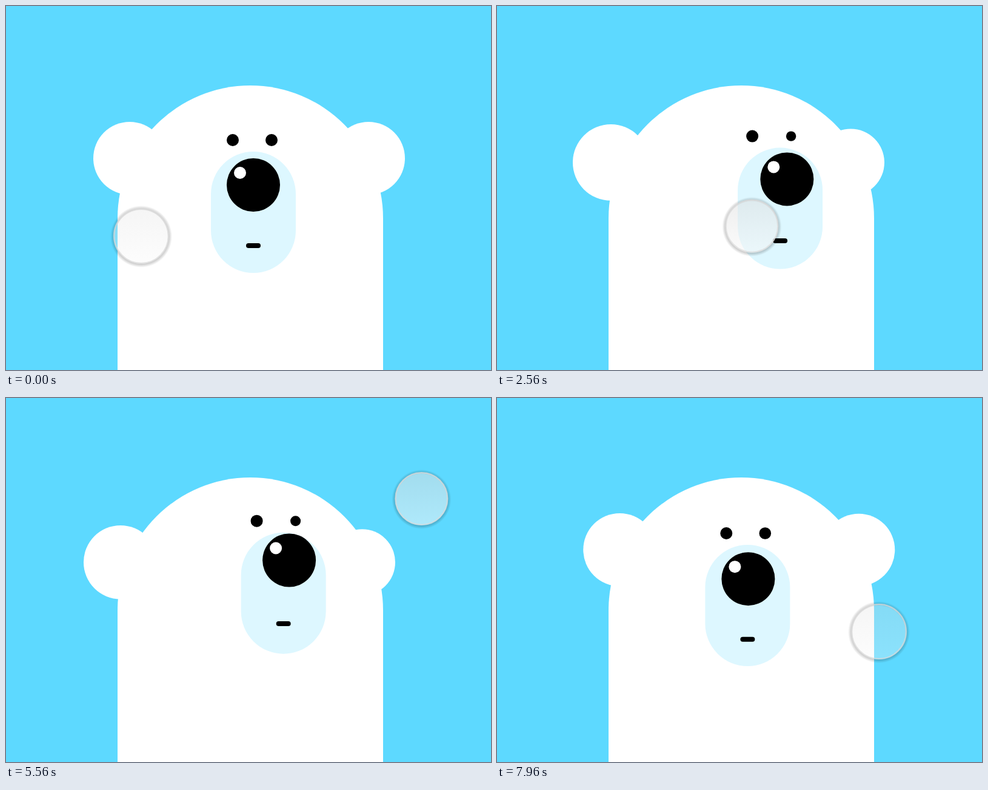
These frames come from a looping animation (800 by 600 pixels, 8000 ms). An HTML page:

```html
<!DOCTYPE html>
<html lang="en">
<head>
<meta charset="utf-8">
<title>Polar bear</title>
<style>
  html, body { margin: 0; width: 100%; height: 100%; overflow: hidden; background: #5dd9ff; }
  svg { display: block; width: 100vw; height: 100vh; }
</style>
</head>
<body>
<svg viewBox="0 0 800 600">
  <defs>
    <linearGradient id="glass" x1="0" y1="0" x2="0" y2="1">
      <stop offset="0" stop-color="#dfdfdf"/>
      <stop offset="1" stop-color="#f7f7f7"/>
    </linearGradient>
    <radialGradient id="shade">
      <stop offset=".85" stop-color="#000" stop-opacity="0"/>
      <stop offset=".89" stop-color="#000" stop-opacity=".2"/>
      <stop offset="1" stop-color="#000" stop-opacity="0"/>
    </radialGradient>
  </defs>
  <rect width="800" height="600" fill="#5dd9ff"/>
  <g fill="#fff">
    <circle id="earL"/>
    <circle id="earR"/>
    <path d="M184 600V350a219 219 0 0 1 438 0V600Z"/>
  </g>
  <rect id="muzzle" width="140" height="200" rx="70" fill="#ddf7ff"/>
  <circle id="eyeL"/>
  <circle id="eyeR"/>
  <rect id="mouth" width="24" height="8" rx="4"/>
  <circle id="nose" r="44"/>
  <circle id="shine" r="10" fill="#fff"/>
  <g id="touch">
    <circle id="halo" cy="1" fill="url(#shade)"/>
    <circle id="disc" fill="url(#glass)"/>
    <circle id="rim" fill="none" stroke="#dcdcdc" stroke-opacity=".7" stroke-width="2.4"/>
  </g>
</svg>
<script>
const LOOP = 8000;

// Each drag runs from press to release through points of time, x, y
const drags = [
  [[260, 201, 349], [780, 573, 368], [1200, 454, 364], [1670, 75, 367]],
  [[2130, 169, 428], [2560, 420, 363], [2790, 496, 265], [3520, 198, 59], [3740, 105, 47]],
  [[4260, 474, 353], [4920, 202, 113], [5600, 690, 170]],
  [[5980, 607, 217], [6240, 407, 323], [6650, 300, 457]],
  [[6980, 293, 342], [7650, 624, 464]]
];
const path = [[0, 223, 379], ...drags.flat(), [LOOP - 40, 630, 385]];

const $ = id => document.getElementById(id);
const clamp = v => Math.max(0, Math.min(1, v));
const sided = (v, neg, pos) => v * (v < 0 ? neg : pos);

function set(id, attrs) {
  for (const k in attrs) $(id).setAttribute(k, attrs[k]);
}

function slope(i, k) {
  if (i === 0 || i === path.length - 1) return 0;
  const [a, b, c] = [path[i - 1], path[i], path[i + 1]];
  const d0 = (b[k] - a[k]) / (b[0] - a[0]);
  const d1 = (c[k] - b[k]) / (c[0] - b[0]);
  // Harmonic mean keeps the curve from overshooting its points
  return d0 * d1 <= 0 ? 0 : 2 * d0 * d1 / (d0 + d1);
}

function finger(t) {
  let i = 0;
  while (i < path.length - 2 && t >= path[i + 1][0]) i++;
  const a = path[i], b = path[i + 1], h = b[0] - a[0], u = clamp((t - a[0]) / h);
  return [1, 2].map(k =>
    a[k] * (1 + 2 * u) * (1 - u) ** 2 + b[k] * u * u * (3 - 2 * u) +
    h * (slope(i, k) * u * (1 - u) ** 2 - slope(i + 1, k) * u * u * (1 - u)));
}

// How far the face is turned: follows the drag, then springs back
function turn(t) {
  const drag = drags.findLast(d => d[0][0] <= t);
  if (!drag) return [0, 0];
  const [, x0, y0] = drag[0], off = drag.at(-1)[0];
  const [x, y] = finger(Math.min(t, off));
  const s = 0.014 * Math.max(0, t - off);
  const left = (1 + s) * Math.exp(-s);
  return [(x - x0) * 0.235 * left, sided(y - y0, 0.098, 0.235) * left];
}

function pressure(t) {
  return Math.max(...drags.map(d =>
    clamp((t - d[0][0]) / 140) * clamp((d.at(-1)[0] + 140 - t) / 140)));
}

function draw(t) {
  const [h, v] = turn(t);

  const shift = -sided(h, 0.25, 0.322);
  const earY = 251 - sided(v, 1.08, 0.43);
  const earR = 60 - sided(v, -0.12, 0.07);
  const rl = earR + h * 0.062, rr = earR - h * 0.065;
  set('earL', { cx: 144 + shift + rl, cy: earY, r: rl });
  set('earR', { cx: 658 + shift - rr, cy: earY, r: rr });

  set('muzzle', { x: 338 + h, y: 240 + v });
  set('mouth', { x: 396 + sided(h, 1.125, 1), y: 391 + sided(v, 1.25, 1.44) });

  const eyeX = 406 + sided(h, 0.9, 0.797), eyeY = 221 + v;
  set('eyeL', { cx: eyeX - 32, cy: eyeY, r: 10 + Math.min(0, h) * 0.03 });
  set('eyeR', { cx: eyeX + 32, cy: eyeY, r: 10 - Math.max(0, h) * 0.03 });

  const noseX = 408 + sided(h, 1.345, 1.19), noseY = 295 + sided(v, 1.5, 1.6);
  set('nose', { cx: noseX, cy: noseY });
  set('shine', { cx: noseX - 22, cy: noseY - 20 });

  const [x, y] = finger(t), p = pressure(t), r = 45.5 - 2 * p;
  set('touch', { transform: `translate(${x} ${y})` });
  set('halo', { r: r + 5.5 });
  set('disc', { r, 'fill-opacity': 0.3 + 0.23 * p });
  set('rim', { r: r - 0.6 });
}

const start = performance.now();
function tick() {
  draw((performance.now() - start) % LOOP);
  requestAnimationFrame(tick);
}
tick();
</script>
</body>
</html>
```
